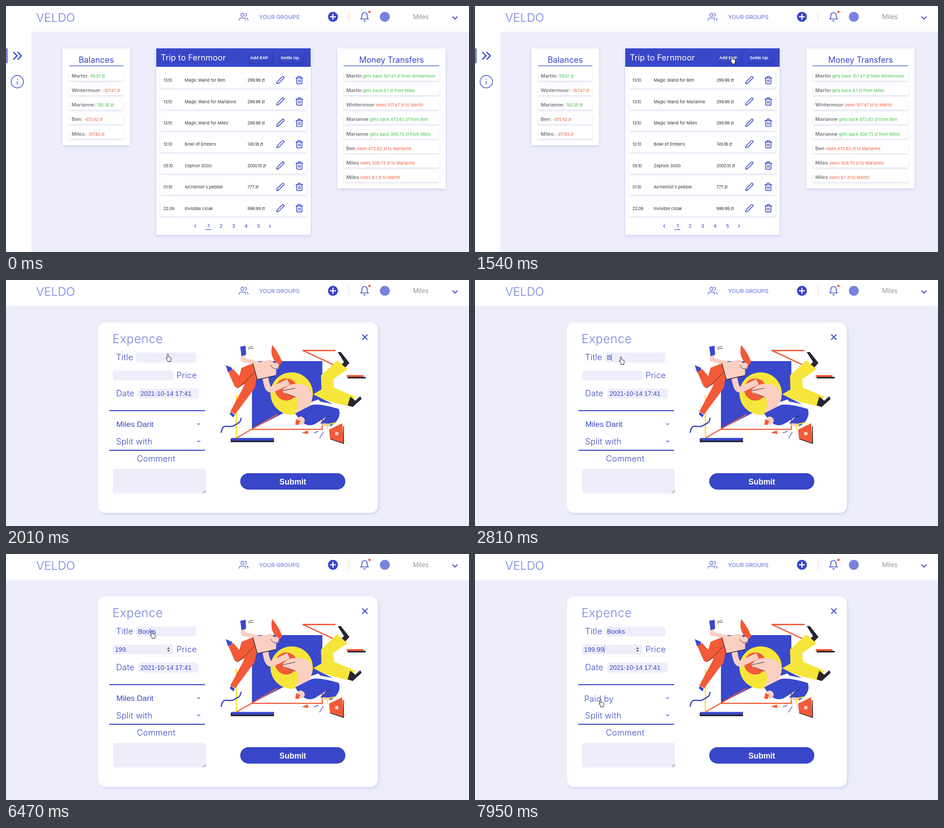
An HTML page for the animation above (8 s loop, 1026 by 546 pixels).

```html
<!DOCTYPE html>
<html lang="en">
<head>
<meta charset="utf-8">
<title>Shared expenses</title>
<style>
html, body { margin: 0; width: 100%; height: 100%; overflow: hidden; background: #eeeefb }
svg { display: block; width: 1026px; height: 546px }
text { font-family: Inter, "Open Sans", sans-serif; white-space: pre }
.arial { font-family: "Liberation Sans", Arial, sans-serif }
.card { fill: #fff; filter: drop-shadow(0 2px 3px #c9cbee) }
.item { fill: #fff; filter: drop-shadow(0 2px 2px #dcdcf0) }
.modal { fill: #fff; filter: drop-shadow(3px 3px 3px #d3d5f3) }
.button { fill: #3846c8; filter: drop-shadow(2px 2px 2px #2934a0) drop-shadow(-1px -1px 2px #4a5ae0) }
.line { fill: none; stroke-linecap: round; stroke-linejoin: round }
.num { letter-spacing: -.4px }
.label { letter-spacing: .3px; font-weight: 350 }
</style>
</head>
<body>
<svg id="stage" viewBox="0 0 1026 546"></svg>
<script>
const BLUE = '#3846c8', SOFT = '#7783de', FIELD = '#eeeefb', GREEN = '#42c245', RED = '#ee6240';
const ORANGE = '#f25a38', YELLOW = '#f6e63c', SKIN = '#fad0c3', INK = '#262530', ART = '#3a48cc';

// ---- markup helpers ----
const rect = (x, y, w, h, fill, r = 0, cls = '') =>
  `<rect x="${x}" y="${y}" width="${w}" height="${h}" rx="${r}" ${cls ? `class="${cls}"` : `fill="${fill}"`}/>`;
const text = (x, y, s, size, fill = BLUE, attrs = '') =>
  `<text x="${x}" y="${y}" font-size="${size}" fill="${fill}" ${attrs}>${s}</text>`;
const circle = (x, y, r, fill) => `<circle cx="${x}" cy="${y}" r="${r}" fill="${fill}"/>`;
const line = (d, color = BLUE, width = 2) => `<path class="line" d="${d}" stroke="${color}" stroke-width="${width}"/>`;
const shape = (d, fill) => `<path d="${d}" fill="${fill}"/>`;
const limb = (d, color, width) =>
  `<path d="${d}" fill="none" stroke="${color}" stroke-width="${width}" stroke-linejoin="round"/>`;
const icon = (d, cx, cy, scale, width) =>
  `<g transform="translate(${cx - 12 * scale} ${cy - 12 * scale}) scale(${scale})">${line(d, BLUE, width)}</g>`;
const MIDDLE = 'text-anchor="middle"';

const ICONS = {
  users: 'M17 21v-2a4 4 0 0 0-4-4H5a4 4 0 0 0-4 4v2M23 21v-2a4 4 0 0 0-3-3.9M16 3.1a4 4 0 0 1 0 7.8M13 7a4 4 0 1 1-8 0a4 4 0 1 1 8 0',
  bell: 'M18 8A6 6 0 0 0 6 8c0 7-3 9-3 9h18s-3-2-3-9M13.7 21a2 2 0 0 1-3.4 0',
  pencil: 'M17 3a2.8 2.8 0 1 1 4 4L7.5 20.5 2 22l1.5-5.5L17 3z',
  trash: 'M3 6h18M19 6v14a2 2 0 0 1-2 2H7a2 2 0 0 1-2-2V6M8 6V4a2 2 0 0 1 2-2h4a2 2 0 0 1 2 2v2M10 11v6M14 11v6'
};

const header = () => rect(0, 0, 1026, 57, '#fff') +
  text(67, 34.5, 'VELDO', 26, SOFT, 'font-weight="300"') +
  icon(ICONS.users, 526.5, 24, .88, 1.3) +
  text(561, 28.5, 'YOUR GROUPS', 12.3, SOFT, 'font-weight="500"') +
  circle(724.5, 24, 11, BLUE) + line('M719 24h11M724.5 18.5v11', '#fff', 2.6) +
  rect(759, 12, 1.3, 23, '#ecd6e2') +
  icon(ICONS.bell, 794.5, 24, .95, 1.8) + circle(805.5, 13, 2.6, ORANGE) +
  circle(839.5, 24, 11, SOFT) + text(902, 28.5, 'Miles', 14, '#777', 'font-weight="300"') +
  line('M990 24l5 5 5-5');

const balances = [['Martin', '115.57'], ['Wintermoor', '-107.47'], ['Marianne', '782.35'], ['Ben', '-472.62'], ['Miles', '-317.83']];
const transfers = [
  ['Martin', 'gets back 107.47 zł from Wintermoor'], ['Martin', 'gets back 8.1 zł from Miles'],
  ['Wintermoor', 'owes 107.47 zł to Martin'], ['Marianne', 'gets back 472.62 zł from Ben'],
  ['Marianne', 'gets back 309.73 zł from Miles'], ['Ben', 'owes 472.62 zł to Marianne'],
  ['Miles', 'owes 309.73 zł to Marianne'], ['Miles', 'owes 8.1 zł to Martin']
];
const expenses = [
  ['13.10', 'Magic Wand for Ben', '299.99'], ['13.10', 'Magic Wand for Marianne', '299.99'],
  ['13.10', 'Magic Wand for Miles', '299.99'], ['12.10', 'Bowl of Embers', '745.18'],
  ['05.10', 'Zephon 3000', '2000.15'], ['01.10', "Alchemist's pebble", '777'], ['22.09', 'Invisible cloak', '999.99']
];

// Name in bold followed by a coloured amount
const entry = (x, i, width, name, info, color, cls) => {
  const y = 146.5 + i * 32.1;
  return rect(x, y, width, 19.5, '', 1, 'item') +
    text(x + 5.5, y + 12.6, `${name} <tspan class="${cls}" font-size="9.3" font-weight="400" fill="${color}">${info}</tspan>`,
      10.9, '#77777c', 'font-weight="600"');
};

const dashboard = () => rect(0, 57, 56, 489, '#fff') + rect(0, 94, 4, 33, SOFT) +
  line('M17 103l7.5 7.5-7.5 7.5M26.5 103l7.5 7.5-7.5 7.5', BLUE, 2.6) +
  `<circle cx="25" cy="168" r="13.7" fill="none" stroke="${BLUE}" stroke-width="1.5"/>` +
  line('M25 167v7', BLUE, 1.4) + circle(25, 163, 1.1, BLUE) +
  rect(125, 94, 150, 215, '', 0, 'card') + text(200, 125.5, 'Balances', 18.2, BLUE, MIDDLE) + rect(140, 131.7, 120, 2, SOFT) +
  balances.map(([name, sum], i) => entry(140, i, 120, name + ':', sum + ' zł', sum[0] === '-' ? RED : GREEN, 'num')).join('') +
  rect(734, 94, 240, 311, '', 0, 'card') + text(854.5, 125.5, 'Money Transfers', 18, BLUE, MIDDLE) + rect(748, 131.7, 212, 2, SOFT) +
  transfers.map(([name, info], i) => entry(748.5, i, 211.5, name, info, info[0] === 'o' ? RED : GREEN, '')).join('') +
  rect(333, 94, 342, 414, '', 0, 'card') + rect(333, 94, 342, 41, BLUE) +
  text(343, 120.8, 'Trip to Fernmoor', 18.3, '#fff') +
  [['Add EXP', 561], ['Settle Up', 629]].map(([s, x]) => rect(x - 29, 103.5, 58, 22, '', 5, 'button') +
    text(x, 118, s, 9.4, '#fff', MIDDLE + ' class="arial" font-weight="700"')).join('') +
  expenses.map(([date, title, price], i) => {
    const y = 164.7 + i * 47.4;
    return rect(342, y - 16.5, 324, 34, '', 1, 'item') +
      text(349, y + 3.4, date, 9.4, '#34343c', 'class="num"') + text(396, y + 3.4, title, 9.4, '#34343c') +
      text(535, y + 3.4, price + ' zł', 9.4, '#34343c', 'class="num"') +
      icon(ICONS.pencil, 608, y - .3, .82, 2) + icon(ICONS.trash, 650, y - .2, .82, 2.1);
  }).join('') +
  [449, 476.5, 504.3, 532, 559.7].map((x, i) => text(x, 492.3, i + 1, 11, BLUE, MIDDLE)).join('') +
  rect(442, 495.8, 13, 1.2, BLUE) + line('M420.5 486l-2.5 2.6 2.5 2.6M584 486l2.5 2.6-2.5 2.6', BLUE, 1.3);

const illustration = () => shape('M545 180H701V262L633 286L545 331Z', ART) +
  line('M729 156.5H658L730 190', ORANGE, 2.8) + line('M512 350L600 299M545 331.5H701V305', ORANGE, 2.6) +
  circle(633, 252, 47, YELLOW) + circle(621, 243, 24.5, ORANGE) +
  rect(509, 255, 3.2, 96, YELLOW) + rect(498, 352, 96, 8, INK) + rect(500, 350.5, 94, 6, ART) +
  line('M477 338C481 314 494 331 506 323S518 318 521 307', ART, 2.8) +
  // falling figure on the left
  shape('M540 200L555 219L551 240L508 298L497 292L526 238Z', ORANGE) +
  shape('M493 205L503 197L517 213L522 195L549 184L556 221L530 230L513 240L507 237Z', ORANGE) +
  line('M549 206L527 229L513 240', INK, 1) +
  shape('M487 189L501 195L500 200L492 205Z', ART) + shape('M498 293L507 299L504 305L496 298Z', ART) +
  limb('M559 185L525 177L526 158', SKIN, 9) + shape('M519 148L531 146L532 166L522 169Z', ART) +
  line('M537 150L547 147M537 153L549 151', INK, 1) +
  limb('M574 212C577 232 580 246 590 243L626 226', SKIN, 13) +
  shape('M547 185L586 177C598 183 600 200 598 212L557 221Z', SKIN) +
  line('M547 185L557 221L598 212', INK, 1.3) +
  shape('M590 144C586 161 588 176 604 188L612 182C606 166 599 156 590 144Z', ORANGE) +
  circle(598, 191, 7.5, SKIN) + line('M587 189C591 200 603 200 606 189', INK, 1) + shape('M601 182L612 182L606 190Z', ORANGE) +
  // tumbling figure on the right
  shape('M612 246C619 235 633 229 649 231C669 231 681 246 678 263C676 275 670 287 660 297L641 294C648 284 651 270 642 260L617 252Z', SKIN) +
  line('M613 246L641 240M642 260L618 251', INK, 1) +
  shape('M680 254L699 243L698 212L734 178L757 198L725 220L727 239L774 259L763 281L725 272L698 263Z', YELLOW) +
  shape('M680 253L699 263L724 275L697 270Z', ART) +
  shape('M735 160L742 160L761 184L752 194L744 187L749 182Z', INK) + shape('M763 259L774 268L785 258L788 264L768 282L757 278Z', INK) +
  shape('M641 296L676 278C691 273 723 282 737 286C744 300 733 319 717 325L697 318L710 304L684 320C668 327 655 319 641 296Z', ART) +
  line('M697 318L711 304L720 301', INK, 1) +
  circle(653, 312, 9, SKIN) + shape('M643 309L652 313L648 322L641 321Z', ORANGE) +
  limb('M718 322L701 321', SKIN, 6) + shape('M716 332L745 318L749 363L718 352Z', ORANGE) +
  line('M748 325V363L719 353', INK, 1.6) + circle(733, 341, 4, SKIN) + line('M713 331L711 321L731 317', YELLOW, 2.5) +
  rect(755, 211, 37, 4, ORANGE) + rect(757, 215, 40, 3.5, INK) +
  shape('M655 339L669 334L670 342Z', ORANGE) + line('M683 339L692 336M695 351L703 338', ART, 1.4);

const modal = () => rect(204, 94, 620, 423, '', 16, 'modal') +
  text(236, 140, 'Expence', 26.5, SOFT, 'letter-spacing=".7" font-weight="350"') +
  [['Title', 244, 178], ['Price', 378, 218], ['Date', 244, 258], ['Split with', 244, 365], ['Comment', 290, 403]]
    .map(([s, x, y]) => text(x, y, s, 18.4, BLUE, 'class="label"')).join('') +
  rect(288, 161, 134, 22, FIELD, 5) + rect(237, 201, 134, 22, FIELD, 5) + rect(293, 241, 134, 22, FIELD, 5) +
  text(298, 257.3, '2021-10-14 17:41', 14.3, BLUE, 'class="arial"') +
  rect(229, 288.8, 212, 2.3, BLUE) + rect(229, 376.8, 212, 2.3, BLUE) +
  line('M424 318.5l2.7 2.7 2.7-2.7M424 356.8l3 2.7 3-2.7', BLUE, 1.2) +
  rect(237, 419, 206, 55, FIELD, 5) + line('M436.5 472.5l6-6M440 472.5l2.5-2.5', '#555', .9) +
  rect(519, 428.8, 233, 36.4, BLUE, 18.2) + text(635.5, 453.5, 'Submit', 17.5, '#fff', MIDDLE + ' class="arial" font-weight="700"') +
  text(244.5, 326, 'Miles Darit', 17.4, BLUE, 'class="arial" id="payer"') +
  text(242, 327.5, 'Paid by', 18.4, BLUE, 'class="label" id="paidBy"') +
  text(292.5, 177.3, '', 14.4, BLUE, 'class="arial" id="title"') +
  text(241.5, 217.3, '', 14.4, BLUE, 'class="arial" id="price"') +
  `<g id="spinner">${shape('M357 210.5l3-3.5 3 3.5zM357 213.5l3 3.5 3-3.5z', '#444')}</g>` +
  `<rect id="caret" width="1" height="16" fill="${BLUE}"/>` +
  `<g id="art">${illustration()}${line('M790 121.5l10.5 10.5M800.5 121.5l-10.5 10.5', BLUE, 2.2)}</g>`;

document.getElementById('stage').innerHTML = `<g id="dash">${dashboard()}</g>` + header() +
  `<g id="form">${modal()}</g><g id="cursor" fill="#fff" stroke="#111" stroke-width="1" stroke-linejoin="round">
  <path id="arrow" d="M.5.5v11.5l2.7-2.5 2 4.5 2-.9-2-4.4h3.6z"/>
  <path id="hand" d="M-1 2a1.5 1.5 0 0 1 3 0v5l4 1q2 .5 2 2.5l-1 4v3H.5V15L-3.2 11q-.8-1.5.8-1.6L-1 10.5z"/></g>`;

// ---- timeline ----
const LOOP = 8000, OPEN = 1610, ART_IN = 1700, PRICE_FOCUS = 4400, PAYER_CLEARED = 7880, TICK = 67, BLINK = 530;
const path = [
  [260, 981, 530], [930, 565, 103], [1190, 565, 103], [1260, 569, 111], [1609, 569, 111], [1610, 454, 145],
  [1700, 448, 147], [2270, 323, 170], [7060, 323, 170], [7260, 321, 172], [7470, 328, 168], [7950, 278, 322]
];
const edits = [
  [2080, 'title', ''], [2810, 'title', 'B'], [3140, 'title', 'Bo'], [3410, 'title', 'Boo'], [3670, 'title', 'Book'],
  [3870, 'title', 'Books'], [4400, 'price', ''], [5140, 'price', '1'], [5410, 'price', '19'], [5540, 'price', '199'],
  [5940, 'price', '199.'], [6600, 'price', '199.9'], [6740, 'price', '199.99']
];
const hotspots = {
  dash: [[532, 103, 592, 126]],
  form: [[288, 161, 422, 183], [237, 201, 371, 223], [293, 241, 427, 263], [229, 303, 441, 341]]
};

const $ = id => document.getElementById(id);
const show = (id, on) => $(id).style.display = on ? '' : 'none';
const last = (list, t) => list.filter(e => e[0] <= t).pop();

function cursorAt(t) {
  const i = path.findLastIndex(k => k[0] <= t);
  const [t0, x0, y0] = path[i], [t1, x1, y1] = path[i + 1] || [t0 + 1, x0, y0];
  const p = Math.min(1, TICK * Math.floor((t - t0) / TICK) / (t1 - t0));
  const e = 1 - (1 - p) ** 2;
  return [x0 + (x1 - x0) * e, y0 + (y1 - y0) * e];
}

function render(t) {
  const open = t >= OPEN;
  show('dash', !open);
  show('form', open);
  show('art', t >= ART_IN);
  show('spinner', t >= PRICE_FOCUS);
  show('payer', t < PAYER_CLEARED);
  show('paidBy', t >= PAYER_CLEARED);

  for (const id of ['title', 'price'])
    $(id).textContent = (last(edits.filter(e => e[1] === id), t) || [0, id, ''])[2];
  const edit = last(edits, t);
  show('caret', edit && (t - edit[0]) % (2 * BLINK) < BLINK);
  if (edit) {
    const field = $(edit[1]);
    $('caret').setAttribute('x', Math.round(+field.getAttribute('x') + (edit[2] && field.getComputedTextLength())));
    $('caret').setAttribute('y', edit[1] === 'title' ? 164 : 204);
  }

  show('cursor', t >= path[0][0]);
  if (t >= path[0][0]) {
    const [x, y] = cursorAt(t);
    const over = hotspots[open ? 'form' : 'dash'].some(([l, top, r, b]) => x >= l && x <= r && y >= top && y <= b);
    $('cursor').setAttribute('transform', `translate(${x} ${y})`);
    show('hand', over);
    show('arrow', !over);
  }
}

function frame() {
  render(performance.now() % LOOP);
  requestAnimationFrame(frame);
}
frame();
</script>
</body>
</html>
```
